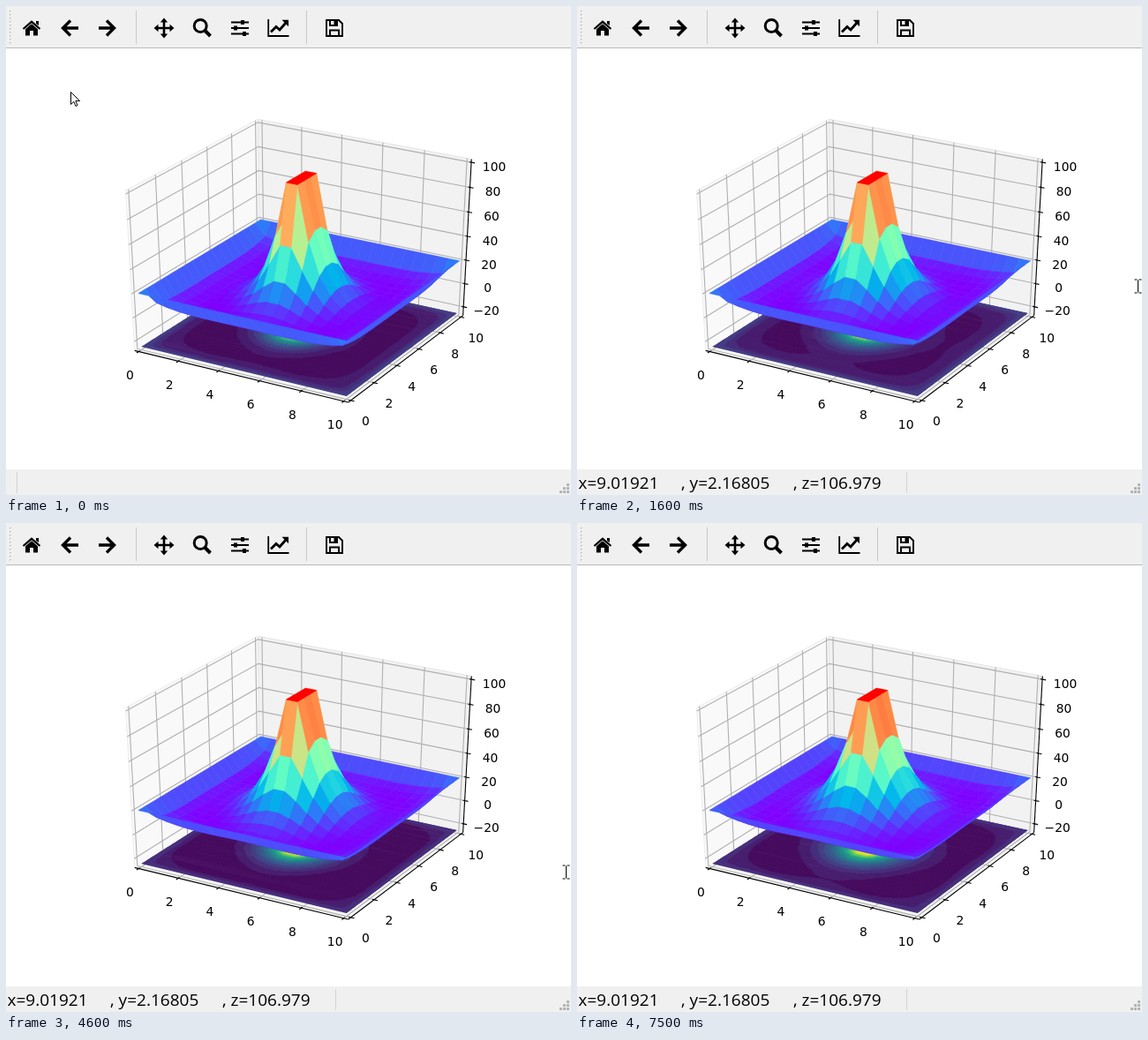
An HTML page with a canvas for the animation above (8000 ms loop, 640 by 554 pixels).

```html
<!DOCTYPE html>
<html lang="en">
<head>
<meta charset="utf-8">
<title>Heat surface</title>
<style>
html, body { margin: 0; width: 100%; height: 100%; overflow: hidden; background: #fff; }
canvas { display: block; }
</style>
</head>
<body>
<canvas id="stage" width="640" height="554"></canvas>
<script>
const LOOP = 8000;
const N = 20;              // grid nodes per side
const HALF = 0.5 + 1 / 48; // pane distance from the cube centre
const UPDATES = [0, 500, 1000, 1600, 2100, 2700, 3300, 3900, 4600, 5300, 6000, 6700, 7500];
const ctx = document.getElementById('stage').getContext('2d');

// ---- heat simulation ----
const at = (i, j) => i * N + j;
const isEdge = i => i === 0 || i === N - 1;
const isSource = (i, j) => (i === 9 || i === 10) && j >= 8 && j <= 11;

function firstField() {
  const f = new Float64Array(N * N);
  for (let i = 0; i < N; i++) for (let j = 0; j < N; j++)
    f[at(i, j)] = isSource(i, j) ? 100 : isEdge(i) || isEdge(j) ? 20 : 0;
  return f;
}

function step(f) {
  const g = f.slice(), rate = 0.01, wall = 0.28;
  for (let i = 1; i < N - 1; i++) for (let j = 1; j < N - 1; j++) {
    if (isSource(i, j)) continue;
    let sum = 0;
    for (const [a, b] of [[i - 1, j], [i + 1, j], [i, j - 1], [i, j + 1]])
      sum += (f[at(a, b)] - f[at(i, j)]) * (isEdge(a) || isEdge(b) ? wall : 1);
    g[at(i, j)] += rate * sum;
  }
  return g;
}

function simulate() {
  const history = [firstField()];
  const axisMin = f => Math.min(...[1, 2, 3, 4, 5, 6, 7].map(j => f[at(9, j)]));
  const grow = () => history.push(step(history[history.length - 1]));
  let saddle = 0;
  while (history.length < 3000 && Math.min(...history[history.length - 1]) < 5) {
    grow();
    if (!saddle && axisMin(history[history.length - 1]) >= 5) saddle = history.length - 1;
  }
  const pace = (history.length - 1 - saddle) / 6;
  return UPDATES.map((_, k) => {
    const n = Math.max(1, Math.round(saddle + (k - 1.5) * pace));
    while (history.length <= n) grow();
    return history[n];
  });
}

// ---- projection, elevation 30, azimuth -60 ----
const C = Math.sqrt(3) / 2;
const depth = (x, y, z) => 0.5 * C * x - 0.75 * y + 0.5 * z;
function project(x, y, z) {
  const w = 10 - depth(x, y, z);
  return [80 + ((C * x + 0.5 * y) / w + 0.095) * 2681,
          471.5 - ((-0.25 * x + 0.5 * C * y + C * z) / w + 0.095) * 1985];
}
const unit = v => v / 10 - 0.5;
const height = t => (t + 25) / 125 - 0.5;

// ---- colours ----
const VIRIDIS = [[68, 1, 84], [72, 36, 117], [65, 68, 135], [53, 95, 141], [42, 120, 142], [33, 145, 140],
  [34, 168, 132], [68, 191, 112], [122, 209, 81], [189, 223, 38], [253, 231, 37]];
const rgb = c => `rgb(${c.map(Math.round)})`;
function viridis(v) {
  const i = Math.min(9, Math.floor(v * 10)), p = v * 10 - i;
  return rgb(VIRIDIS[i].map((a, c) => a + (VIRIDIS[i + 1][c] - a) * p));
}
const rainbow = v => rgb([Math.abs(2 * v - 0.5), Math.sin(Math.PI * v), Math.cos(Math.PI * v / 2)]
  .map(c => 255 * Math.min(1, Math.max(0, c))));

// ---- drawing helpers ----
function trace(g, points) {
  g.beginPath();
  points.forEach((p, i) => i ? g.lineTo(...p) : g.moveTo(...p));
}
function fill(g, points, color) {
  trace(g, points);
  g.closePath();
  g.fillStyle = color;
  g.fill();
}
function line(g, a, b, color, width = 1.1) {
  trace(g, [project(...a), project(...b)]);
  g.strokeStyle = color;
  g.lineWidth = width;
  g.stroke();
}
function layer(draw) {
  const c = document.createElement('canvas');
  c.width = 640;
  c.height = 554;
  draw(c.getContext('2d'));
  return c;
}

// ---- axes ----
function drawAxes(g) {
  const H = HALF, pane = (pts, c) => fill(g, pts.map(p => project(...p)), c);
  pane([[-H, -H, -H], [-H, H, -H], [-H, H, H], [-H, -H, H]], '#f9f9f9');
  pane([[-H, H, -H], [H, H, -H], [H, H, H], [-H, H, H]], '#f2f2f2');
  pane([[-H, -H, -H], [H, -H, -H], [H, H, -H], [-H, H, -H]], '#f6f6f6');
  line(g, [-H, H, -H], [-H, H, H], '#e6e6e6');
  line(g, [-H, H, H], [H, H, H], '#e6e6e6');
  line(g, [-H, -H, H], [-H, H, H], '#eeeeee');
  line(g, [-H, -H, -H], [-H, -H, H], '#eeeeee');

  const grid = '#b0b0b0', ink = '#000', out = 0.0083, inn = 0.0167;
  const label = (text, p, dx, dy) => {
    const [x, y] = project(...p);
    g.fillText(text, x + dx, y + dy + 5);
  };
  const evens = [0, 2, 4, 6, 8, 10], temps = [-20, 0, 20, 40, 60, 80, 100];
  for (const v of evens) {
    const t = unit(v);
    trace(g, [[t, -H, -H], [t, H, -H], [t, H, H]].map(p => project(...p)));
    g.strokeStyle = grid; g.lineWidth = 1.1; g.stroke();
    trace(g, [[H, t, -H], [-H, t, -H], [-H, t, H]].map(p => project(...p)));
    g.stroke();
  }
  for (const v of temps) {
    const t = height(v);
    trace(g, [[-H, -H, t], [-H, H, t], [H, H, t]].map(p => project(...p)));
    g.stroke();
  }
  line(g, [-H, -H, -H], [H, -H, -H], ink);
  line(g, [H, -H, -H], [H, H, -H], ink);
  line(g, [H, H, -H], [H, H, H], ink);

  g.font = '13.89px "DejaVu Sans", sans-serif';
  g.textAlign = 'center';
  g.fillStyle = ink;
  for (const v of evens) {
    const t = unit(v);
    line(g, [t, -H - inn, -H], [t, -H + out, -H], ink);
    line(g, [H + inn, t, -H], [H - out, t, -H], ink);
    label(v, [t, -H, -H], -10, 26.7);
    label(v, [H, t, -H], 17, 23.4);
  }
  for (const v of temps) {
    const t = height(v);
    line(g, [H + inn, H, t], [H - out, H, t], ink);
    label(String(v).replace('-', '\u2212'), [H, H, t], 26, 4.6);
  }
}

// ---- contour bands on the floor ----
function drawFloor(g, field) {
  const M = 190, low = Math.floor(Math.min(...field) / 5) * 5;
  const sample = (x, y) => {
    const i = Math.min(N - 2, Math.floor(x)), j = Math.min(N - 2, Math.floor(y)), p = x - i, q = y - j;
    return (field[at(i, j)] * (1 - p) + field[at(i + 1, j)] * p) * (1 - q) +
           (field[at(i, j + 1)] * (1 - p) + field[at(i + 1, j + 1)] * p) * q;
  };
  const node = m => (m + 0.5) / M * (N - 1);
  const band = (a, b) => Math.min(19, Math.floor(sample(node(a), node(b)) / 5));
  for (let b = 0; b < M; b++) {
    const y0 = b / M - 0.5, y1 = Math.min(M, b + 2) / M - 0.5;
    for (let a = 0, end; a < M; a = end) {
      const level = band(a, b);
      for (end = a + 1; end < M && band(end, b) === level;) end++;
      const x0 = a / M - 0.5, x1 = Math.min(M, end + 1) / M - 0.5;
      fill(g, [[x0, y0], [x1, y0], [x1, y1], [x0, y1]].map(p => project(...p, -0.5)),
        viridis((level * 5 + 2.5 - low) / (100 - low)));
    }
  }
}

function drawSurface(g, field) {
  const faces = [], node = (i, j) => [i / (N - 1) - 0.5, j / (N - 1) - 0.5, height(field[at(i, j)])];
  for (let i = 0; i < N - 1; i++) for (let j = 0; j < N - 1; j++) {
    const ring = [[i, j], [i + 1, j], [i + 1, j + 1], [i, j + 1]];
    const points = ring.map(p => node(...p));
    faces.push({
      points,
      mean: ring.reduce((s, p) => s + field[at(...p)], 0) / 4,
      near: points.reduce((s, p) => s + depth(...p), 0)
    });
  }
  const low = Math.min(...faces.map(f => f.mean));
  faces.sort((a, b) => a.near - b.near);
  for (const f of faces) {
    const color = rainbow((f.mean - low) / (100 - low));
    fill(g, f.points.map(p => project(...p)), color);
    g.strokeStyle = color;
    g.lineWidth = 0.6;
    g.stroke();
  }
}

// ---- window chrome ----
function drawChrome(g) {
  const rect = (x, y, w, h, c) => { g.fillStyle = c; g.fillRect(x, y, w, h); };
  rect(0, 0, 640, 47, '#f0f0f0');
  rect(0, 47, 640, 1, '#b9b9b9');
  rect(0, 525, 640, 29, '#f0f0f0');
  for (let y = 5; y < 43; y += 4) {
    rect(4, y, 2, 2, '#c4c4c4');
    rect(5, y + 1, 1, 1, '#fff');
  }
  rect(147, 5, 1, 38, '#c8c8c8');
  rect(340, 5, 1, 38, '#c8c8c8');
  for (let r = 0; r < 3; r++) for (let c = 2 - r; c < 3; c++)
    rect(627 + c * 4, 541 + r * 4, 3, 3, '#b4b4b4');

  const solid = d => { g.fillStyle = '#000'; g.fill(new Path2D(d), 'evenodd'); };
  const stroke = (d, w) => { g.strokeStyle = '#000'; g.lineWidth = w; g.stroke(new Path2D(d)); };
  // home
  stroke('M19.5 26 L29 17.8 L38.5 26', 2.2);
  solid('M34 17H37V22L34 20ZM22 26.3L29 20.3L36 26.3V33.5H31V28H27V33.5H22Z');
  // back and forward
  stroke('M82 25H65M73 16.5L64.5 25L73 33.5', 3.4);
  stroke('M105 25H122M114 16.5L122.5 25L114 33.5', 3.4);
  // pan
  stroke('M171 25H187M179 17V33', 2.6);
  solid('M179 13.5L183.2 18.5H174.8ZM179 36.5L183.2 31.5H174.8ZM167.5 25L172.5 20.8V29.2ZM190.5 25L185.5 20.8V29.2Z');
  // zoom
  stroke('M227.2 22.5A7 7 0 1 1 213.2 22.5A7 7 0 1 1 227.2 22.5', 3);
  stroke('M225.2 27.8L231.5 34', 4);
  // sliders
  stroke('M255 18.5H275M255 25H275M255 31.5H275', 1.8);
  solid('M266 16H270V21H266ZM258 22.5H262V27.5H258ZM268 29H272V34H268Z');
  // chart
  stroke('M297.2 15V34H320.5', 1.8);
  stroke('M300 29.5L306 23.5L310 27L317 19', 2.8);
  solid('M312.5 15.8H320V23.3Z');
  // save
  stroke('M363 16H377L381 20V34H363ZM367 34V27.5H377V34M367 16V22H375V16', 1.9);
  solid('M371.5 17H374.5V21H371.5Z');
}

function drawStatus(t) {
  ctx.fillStyle = '#d2d2d2';
  ctx.fillRect(t < 500 ? 12 : 373, 528, 1, 24);
  if (t < 500) return;
  ctx.fillStyle = '#000';
  ctx.font = '19px "Open Sans", "Noto Sans", sans-serif';
  ctx.fillText('x=9.01921', 1.5, 547);
  ctx.fillText(', y=2.16805', 118, 547);
  ctx.fillText(', z=106.979', 245, 547);
}

// ---- pointer ----
const ARROW = new Path2D('M.5 .5V14.5L3.8 11.4L6 16.5L8 15.6L5.8 10.6H10.5Z');
const BEAM = new Path2D('M-4 -7.5H-1M1 -7.5H4M0 -7V7M-4 7.5H-1M1 7.5H4');
const POINTER = [
  [0, 'arrow', 73, 97], [700, 'arrow', 538, 285], [800, ''],
  [1100, 'beam', 637.5, 330.5], [1200, 'beam', 635.5, 317.5],
  [4500, 'beam', 635.5, 345.5], [4600, 'beam', 634.5, 395.5], [4700, 'beam', 634.5, 451.5], [4800, '']
];
function drawPointer(t) {
  const [, kind, x, y] = POINTER.filter(p => p[0] <= t).pop();
  if (!kind) return;
  ctx.save();
  ctx.translate(x, y);
  ctx.strokeStyle = '#000';
  ctx.lineWidth = 1;
  if (kind === 'arrow') {
    ctx.fillStyle = '#fff';
    ctx.fill(ARROW);
    ctx.stroke(ARROW);
  } else ctx.stroke(BEAM);
  ctx.restore();
}

const base = layer(g => {
  g.fillStyle = '#fff';
  g.fillRect(0, 0, 640, 554);
  drawAxes(g);
  drawChrome(g);
});
const plots = simulate().map(field => layer(g => {
  drawFloor(g, field);
  drawSurface(g, field);
}));

function render() {
  const t = performance.now() % LOOP;
  ctx.drawImage(base, 0, 0);
  ctx.drawImage(plots[UPDATES.filter(u => u <= t).length - 1], 0, 0);
  drawStatus(t);
  drawPointer(t);
  requestAnimationFrame(render);
}
render();
</script>
</body>
</html>
```
